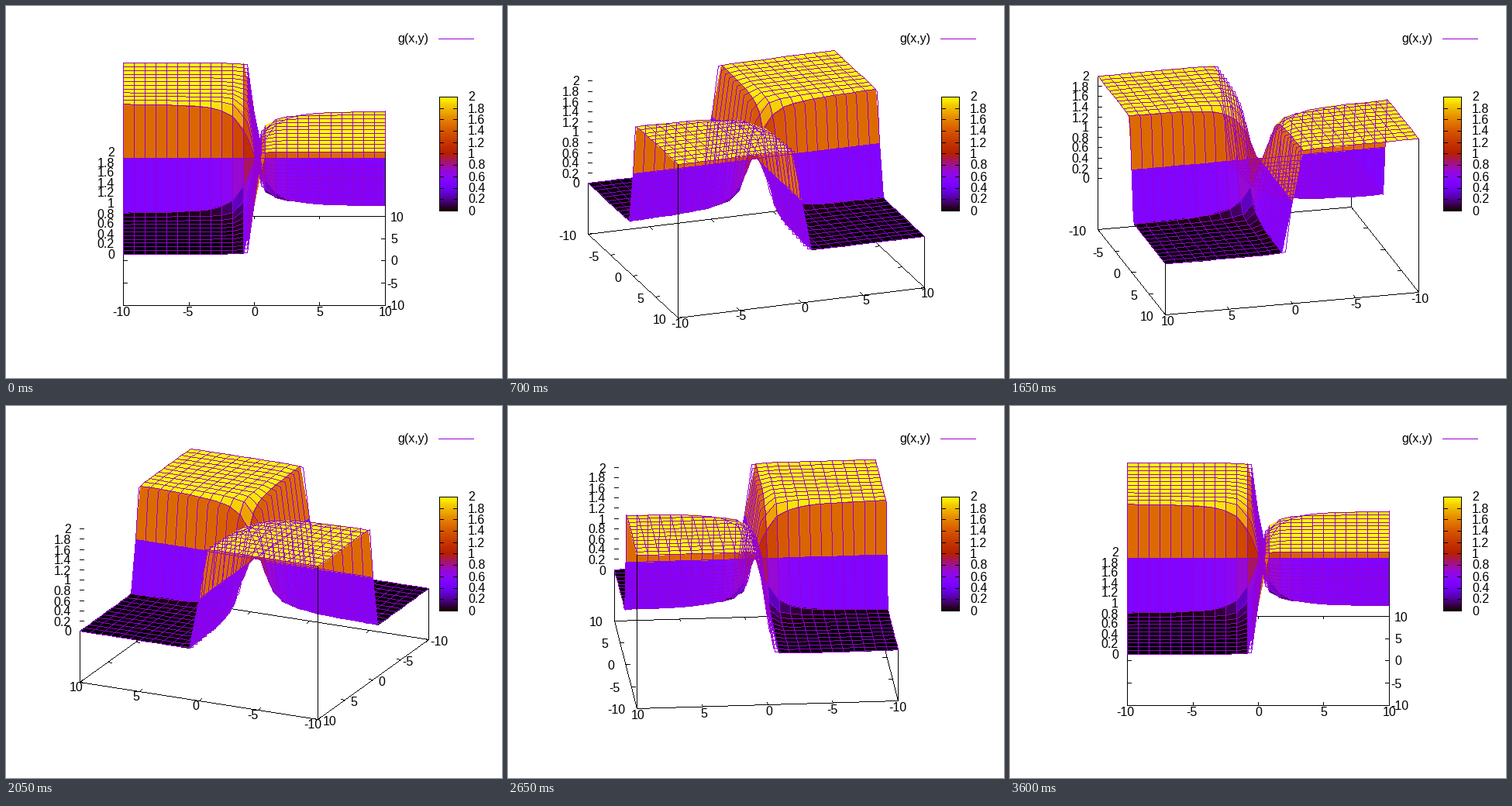
Write a matplotlib script that moves like this. It is 640x480 px and loops after 3650 ms.

```python
import numpy as np
import matplotlib.pyplot as plt
from matplotlib.animation import FuncAnimation
from matplotlib.collections import PolyCollection

W, H, DPI = 640, 480, 80
PX = 72 / DPI                      # points per pixel
FRAMES, STEP = 73, 5               # degrees turned per frame
BLACK, VIOLET = (0, 0, 0, 255), (148, 0, 211, 255)
R = 10
CX, CY = 320, 328.5                # centre of the base plane
SX, SY, SZ = 16.9, 5.715, 66       # pixels per unit
FLOOR = -1

fig = plt.figure(figsize=(W / DPI, H / DPI), dpi=DPI, facecolor="white")
ax = fig.add_axes([0, 0, 1, 1])
ax.axis("off")


def g(x, y):
    p = x * y
    return 1 - p / np.sqrt(p * p + 1.5)


def palette(v):
    """Black-violet-red-yellow ramp for v in 0..1."""
    v = np.clip(v, 0, 1)
    blue = np.clip(np.sin(2 * np.pi * v), 0, 1)
    return np.stack([np.sqrt(v), v ** 3, blue], axis=-1)


def project(x, y, z, a):
    x, y, z = np.broadcast_arrays(x, y, z)
    px = CX + SX * (x * np.cos(a) + y * np.sin(a))
    py = CY - SY * (y * np.cos(a) - x * np.sin(a)) - SZ * (z - FLOOR)
    return np.rint(np.stack([px, py], axis=-1))


class Layer:
    """A see-through sheet for crisp one-pixel lines."""

    def __init__(self, z):
        self.pixels = np.zeros((H, W, 4), np.uint8)
        self.image = ax.imshow(self.pixels, interpolation="nearest",
                               aspect="auto", zorder=z)

    def clear(self):
        self.pixels[:] = 0

    def trace(self, start, end, color):
        start, end = np.asarray(start, float), np.asarray(end, float)
        delta = end - start
        n = np.maximum(np.abs(delta).max(axis=-1), 1)
        k = np.arange(n.max() + 1)
        t = np.minimum(k / n[..., None], 1)[..., None]
        p = np.rint(start[..., None, :] + delta[..., None, :] * t).astype(int)
        self.pixels[p[..., 1], p[..., 0]] = color

    def paths(self, pts, color):
        self.trace(pts[..., :-1, :], pts[..., 1:, :], color)

    def show(self):
        self.image.set_data(self.pixels)


def label(x, y, text, ha="left"):
    return ax.text(x, y + 6, text, ha=ha, va="baseline", color="black",
                   family="Liberation Sans", fontsize=16 * PX, zorder=1)


def put(txt, x, y, ha):
    txt.set_position((x, y + 6))
    txt.set_ha(ha)


# Surface cells, and wire lines sampled more coarsely along their length
node = np.linspace(-R, R, 25)
sample = np.linspace(-R, R, 20)
gx, gy = np.meshgrid(node, node)
gz = g(gx, gy)
cell_z = (gz[:-1, :-1] + gz[1:, :-1] + gz[1:, 1:] + gz[:-1, 1:]) / 4
cell_rgb = palette(cell_z / 2)
rx, ry = np.meshgrid(sample, node)
rz = g(rx, ry)

ticks = np.arange(-R, R + 1, 5)
zticks = np.linspace(0, 2, 11)

fixed, under, over = Layer(2), Layer(2), Layer(4)
surface = PolyCollection([], linewidths=0, edgecolors="none",
                         antialiaseds=False, zorder=3)
surface.set_snap(False)
ax.add_collection(surface, autolim=False)
x_labels = [label(0, 0, str(t)) for t in ticks]
y_labels = [label(0, 0, str(t)) for t in ticks]
z_labels = [label(0, 0, f"{t:.2g}", "right") for t in zticks]


def draw_key():
    label(545, 40, "g(x,y)", "right")
    fixed.trace((558, 42), (603, 42), VIOLET)


def draw_colorbox():
    x0, x1, y0, y1 = 559, 582, 264, 117
    ramp = palette(np.linspace(0, 1, 128))[:, None, :]
    ax.imshow(ramp, extent=(x0, x1, y0, y1), origin="lower",
              interpolation="nearest", aspect="auto", zorder=1)
    box = [(x0, y0), (x1, y0), (x1, y1), (x0, y1), (x0, y0)]
    fixed.paths(np.array(box), BLACK)
    for t in zticks:
        y = round(y0 + (y1 - y0) * t / 2)
        fixed.trace([(x0, y), (x1 - 5, y)], [(x0 + 5, y), (x1, y)], BLACK)
        label(595.5, y - 1, f"{t:.2g}")


def unit(dx, dy):
    n = np.hypot(dx, dy)
    return dx / n, dy / n


def axis_ticks(near, far, u, labels):
    """Ticks on both edges; places the labels outside the near one."""
    ux, uy = u
    tick = np.array([5 * ux, -3.5 * uy])
    under.trace(near, np.rint(near + tick), BLACK)
    under.trace(far, np.rint(far - tick), BLACK)
    if ux > 0.9:
        ha, gap, minus = "right", 15, 0
    elif ux < -0.9:
        ha, gap, minus = "left", 6.6, 4.4
    else:
        ha, gap, minus = "center", 7, 2.2
    for t, txt, (x, y) in zip(ticks, labels, near):
        put(txt, x - gap * ux - (minus if t < 0 else 0), y + 8 * uy, ha)


def draw_frame(a, quad):
    corners = [(R, -R), (R, R), (-R, R), (-R, -R)]
    fx, fy = corners[quad]
    left = corners[quad - 1]
    right = corners[(quad + 1) % 4]
    back = (-fx, -fy)
    c, s = np.cos(a), np.sin(a)

    base = np.array([project(*p, FLOOR, a) for p in corners])
    under.trace(base, np.roll(base, 1, axis=0), BLACK)
    for p in (left, right, back):
        under.trace(project(*p, FLOOR, a), project(*p, g(*p), a), BLACK)
    over.trace(project(fx, fy, FLOOR, a),
               project(fx, fy, g(fx, fy), a), BLACK)

    axis_ticks(project(ticks, fy, FLOOR, a), project(ticks, -fy, FLOOR, a),
               unit(-fy * s, -fy * c / 2), x_labels)
    axis_ticks(project(fx, ticks, FLOOR, a), project(-fx, ticks, FLOOR, a),
               unit(-fx * c, fx * s / 2), y_labels)
    marks = project(*left, zticks, a)
    under.trace(marks, marks + [5, 0], BLACK)
    for txt, (x, y) in zip(z_labels, marks):
        put(txt, x - 11.5, y, "right")


def draw_surface(a):
    p = project(gx, gy, gz, a)
    quads = np.stack([p[:-1, :-1], p[1:, :-1], p[1:, 1:], p[:-1, 1:]], axis=2)
    # back to front
    rows = slice(None, None, -1 if np.cos(a) >= 0 else 1)
    cols = slice(None, None, 1 if np.sin(a) >= 0 else -1)
    surface.set_verts(quads[rows, cols].reshape(-1, 4, 2))
    surface.set_facecolor(cell_rgb[rows, cols].reshape(-1, 3))
    # the height is symmetric in x and y, so one sampling serves both ways
    over.paths(project(rx, ry, rz, a), VIOLET)
    over.paths(project(ry, rx, rz, a), VIOLET)


def update(i):
    deg = i * STEP % 360
    a = np.radians(deg)
    under.clear()
    over.clear()
    draw_surface(a)
    draw_frame(a, deg // 90)
    under.show()
    over.show()
    return []


draw_key()
draw_colorbox()
fixed.show()
ax.set_xlim(-0.5, W - 0.5)
ax.set_ylim(H - 0.5, -0.5)

anim = FuncAnimation(fig, update, frames=FRAMES, interval=50,
                     init_func=lambda: [], repeat=True, repeat_delay=0)
plt.show()
```
